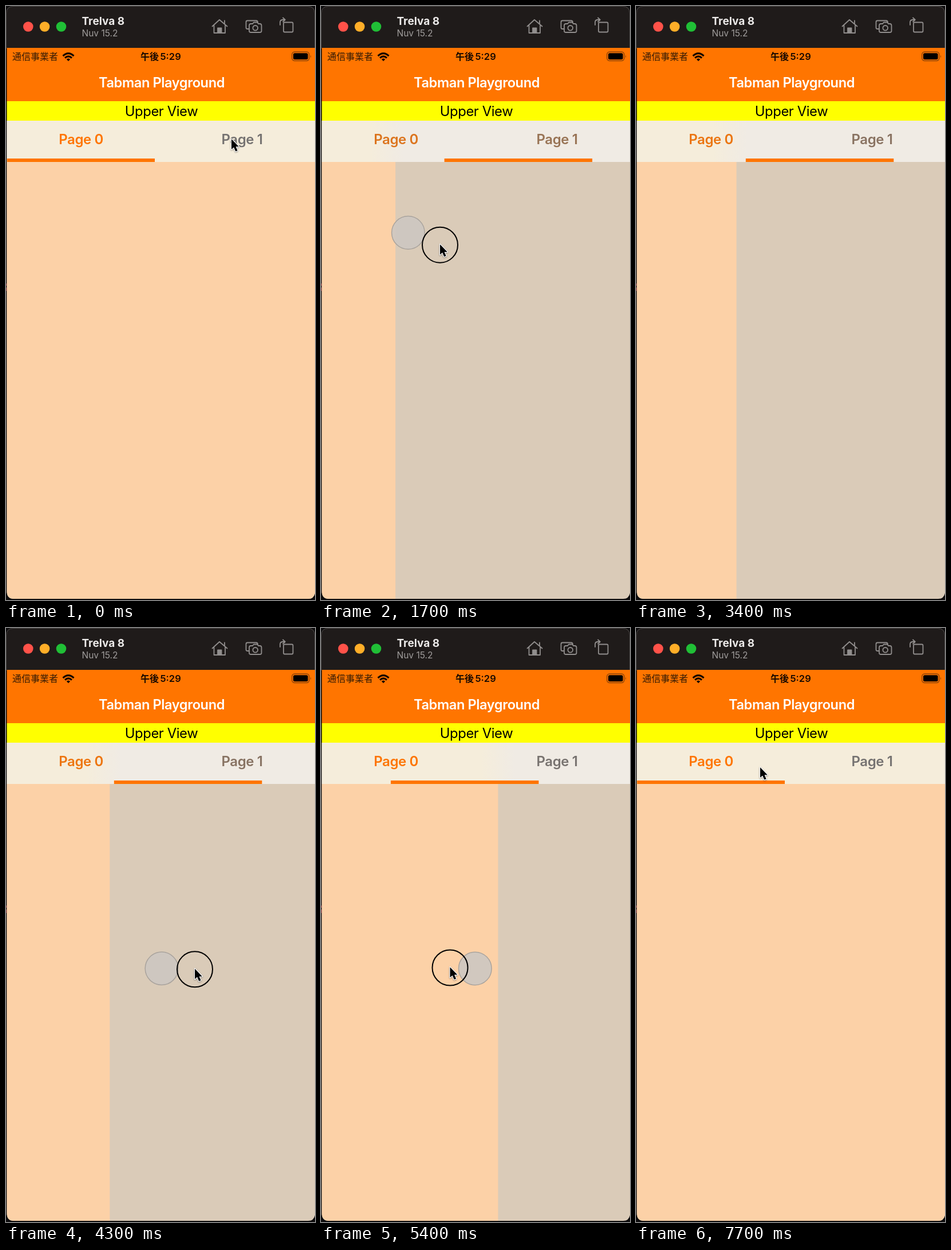
Write an HTML page that moves like this. It is 540 by 1036 pixels and loops after 7.8 s.

```html
<!DOCTYPE html>
<html lang="ja">
<head>
<meta charset="utf-8">
<title>Tabman Playground</title>
<style>
  html, body { margin: 0; width: 100%; height: 100%; overflow: hidden; background: #0d0c0d; }
  svg { display: block; width: 540px; height: 1036px; }
  text { font-family: Inter, "Noto Sans CJK JP", "Noto Sans CJK", sans-serif; }
  .mid { text-anchor: middle; letter-spacing: -.4px; }
  .semi { font-weight: 600; }
  .tab { font-size: 24px; }
  .icon { fill: none; stroke: #918e8d; stroke-width: 1.8; stroke-linejoin: round; stroke-linecap: round; }
  .halo { stroke: #fff; stroke-width: 2.6; stroke-linejoin: round; filter: drop-shadow(0 1px 1px #0006); }
</style>
</head>
<body>
<svg viewBox="0 0 540 1036">
  <defs>
    <clipPath id="window"><path d="M1.5 73H540V1024Q538 1034 528 1034H14Q1.5 1034 1.5 1021Z"/></clipPath>
    <linearGradient id="blur">
      <stop offset="0" stop-color="#f5eddb"/>
      <stop offset="1" stop-color="#f0ebe4"/>
    </linearGradient>
    <path id="arrow" d="M0 0V20L4.600 16L8 24L11.800 22.400L8.400 14.800H14.300Z"/>
  </defs>

  <rect width="540" height="1036" fill="#0d0c0d"/>
  <path d="M1 74V12Q1 0 13 0H528Q540 0 540 12V74Z" fill="#1f1b1a"/>
  <path d="M.5 74V13Q.5 .5 13 .5H527Q539.5 .5 539.5 13V74" fill="none" stroke="#4b4847"/>
  <path d="M0 484v4M0 491v6" stroke="#8b3340" stroke-width="2"/>

  <circle cx="38.800" cy="36" r="8.800" fill="#ff5249"/>
  <circle cx="67.600" cy="36" r="8.800" fill="#ffae28"/>
  <circle cx="96.500" cy="36" r="8.800" fill="#20bf36"/>
  <text x="132.500" y="33" font-size="19" font-weight="700" fill="#eceae9">Trelva 8</text>
  <text x="132.500" y="53" font-size="15.500" fill="#a09d9c">Nuv 15.2</text>

  <g class="icon">
    <path d="M360.500 35.500L373 24L386.500 35.500M363.500 34V47H383V34M382 31V25.500"/>
    <path d="M370 47V38.500H376.500V47Z" fill="#918e8d"/>
    <path d="M424 40H422Q419.500 40 419.500 37.500V28Q419.500 25.500 422 25.500H437Q440 25.500 440 29"/>
    <path d="M428 31H431L433 28.500H439L441 31H443.500Q446.500 31 446.500 34V43.500Q446.500 46 443.500 46H428Q425 46 425 43.500V34Q425 31 428 31Z"/>
    <circle cx="435.700" cy="38.300" r="4.300"/>
    <rect x="485" y="28.500" width="16.500" height="17" rx="2"/>
    <path d="M479 33V28.500Q479 24 484 24H487M484 20.500L487.800 24L484 27.500"/>
  </g>

  <g clip-path="url(#window)">
    <rect y="73" width="540" height="93" fill="#ff7500"/>
    <text x="11" y="94" font-size="16" fill="#351b05">通信事業者</text>
    <path d="M99.500 87.200Q109 78 118.500 87.200M103 90.700Q109 85 115 90.700" fill="none" stroke="#150800" stroke-width="3"/>
    <path d="M105.800 93Q109 90 112.200 93L109 96.300Z" fill="#150800"/>
    <text x="235" y="94" font-size="16" class="semi" fill="#180900">午後</text>
    <text x="269.500" y="94" font-size="16.500" class="semi" fill="#180900">5:29</text>
    <rect x="499.800" y="80" width="30" height="15.500" rx="4.500" fill="none" stroke="#8d4308" stroke-width="1.400"/>
    <rect x="502" y="82.200" width="25.600" height="11.100" rx="2.500"/>
    <path d="M532 85.500Q534 87.700 532 90.500Z" fill="#8d4308"/>
    <text x="272" y="142" font-size="23.600" class="mid semi" fill="#fff">Tabman Playground</text>

    <rect y="166" width="540" height="34" fill="#ff0"/>
    <text x="271.500" y="192" font-size="23.800" class="mid">Upper View</text>

    <rect y="272" width="540" height="764" fill="#dacbb8"/>
    <rect id="page" x="-540" y="272" width="540" height="764" fill="#fcd1a7"/>
    <rect y="200" width="540" height="72" fill="#f0ebe4"/>
    <g id="glow">
      <rect x="-600" y="200" width="571" height="72" fill="#f5eddb"/>
      <rect x="-30" y="200" width="60" height="72" fill="url(#blur)"/>
    </g>
    <text id="tab0" x="131" y="241" class="mid semi tab">Page 0</text>
    <text id="tab1" x="412.500" y="241" class="mid semi tab">Page 1</text>
    <rect id="bar" x="1.500" y="266" width="258.500" height="6" fill="#ff7500"/>
  </g>

  <g id="touch">
    <circle id="disc" r="28.800" fill="#cec8c1" fill-opacity=".93" stroke="#a9a39d" stroke-width="1.500"/>
    <circle id="ring" r="31" fill="none" stroke="#000" stroke-width="2"/>
  </g>
  <g id="cursor">
    <g transform="translate(0 -1) scale(.9)">
      <use href="#arrow" class="halo"/>
      <use href="#arrow"/>
    </g>
  </g>
</svg>

<script>
  const LOOP = 7800, STEP = 100, TOUCH_LAG = 58;
  const GRAY = [117, 114, 113], ORANGE = [255, 117, 0];

  // A tap or swipe starts at `at`, ends at `end`, and turns the page over `turn` ms.
  const tap = (at, end, spot) => ({ at, end, from: spot, to: spot, turn: 300 });
  const swipe = (at, end, from, to, turn) => ({ at, end, from, to, turn, pressed: true });
  const rest = (at, spot) => ({ at, end: LOOP, from: spot, to: spot, turn: 0 });

  const acts = [
    tap(300, 930, [394, 233]),
    swipe(1600, 1900, [112, 380], [400, 490], 420),
    swipe(2025, 3300, [425, 521], [-40, 524], 2030),
    swipe(4100, 4400, [130, 590], [430, 598], 600),
    swipe(5100, 5500, [452, 600], [150, 590], 700),
    tap(6300, 6900, [131, 233]),
    rest(7700, [217, 244])
  ];

  const $ = id => document.getElementById(id);
  const set = (id, name, value) => $(id).setAttribute(name, value);
  const place = (id, x, y = 0) => set(id, "transform", `translate(${x} ${y})`);
  const lerp = (a, b, k) => a + (b - a) * k;
  const blend = (a, b, k) => a.map((v, i) => lerp(v, b[i], k));
  const rgb = (a, b, k) => `rgb(${blend(a, b, k).map(Math.round)})`;
  const smooth = k => k * k * (3 - 2 * k);
  const part = (t, start, end) => Math.min(1, Math.max(0, (t - start) / (end - start)));

  // Straight strokes, with eased glides from one to the next.
  function pointer(t) {
    const next = acts.findIndex(act => t <= act.end);
    const act = acts[next], last = acts[next - 1];
    if (t >= act.at || !last) return blend(act.from, act.to, part(t, act.at, act.end));
    return blend(last.to, act.from, smooth(part(t, last.end, act.at)));
  }

  // Every turn goes the opposite way to the one before.
  const position = t => acts.reduce((p, act, i) =>
    act.turn ? p + part(t, act.at, act.at + act.turn) * (i % 2 ? -1 : 1) : p, 0);

  function draw(t) {
    const p = position(t);
    place("page", 540 - 538 * p);
    place("glow", lerp(560, -25, p));
    place("bar", 281 * p);

    const k = p ** 5;
    set("tab0", "fill", rgb(ORANGE, GRAY, k));
    set("tab1", "fill", rgb(GRAY, ORANGE, k));

    const spot = pointer(t);
    const pressed = acts.some(act => act.pressed && t >= act.at && t <= act.end);
    set("touch", "visibility", pressed ? "visible" : "hidden");
    place("cursor", ...spot);
    place("ring", ...spot);
    place("disc", ...pointer(t - TOUCH_LAG));
  }

  function tick() {
    draw(Math.floor(performance.now() % LOOP / STEP) * STEP);
    requestAnimationFrame(tick);
  }
  tick();
</script>
</body>
</html>
```
